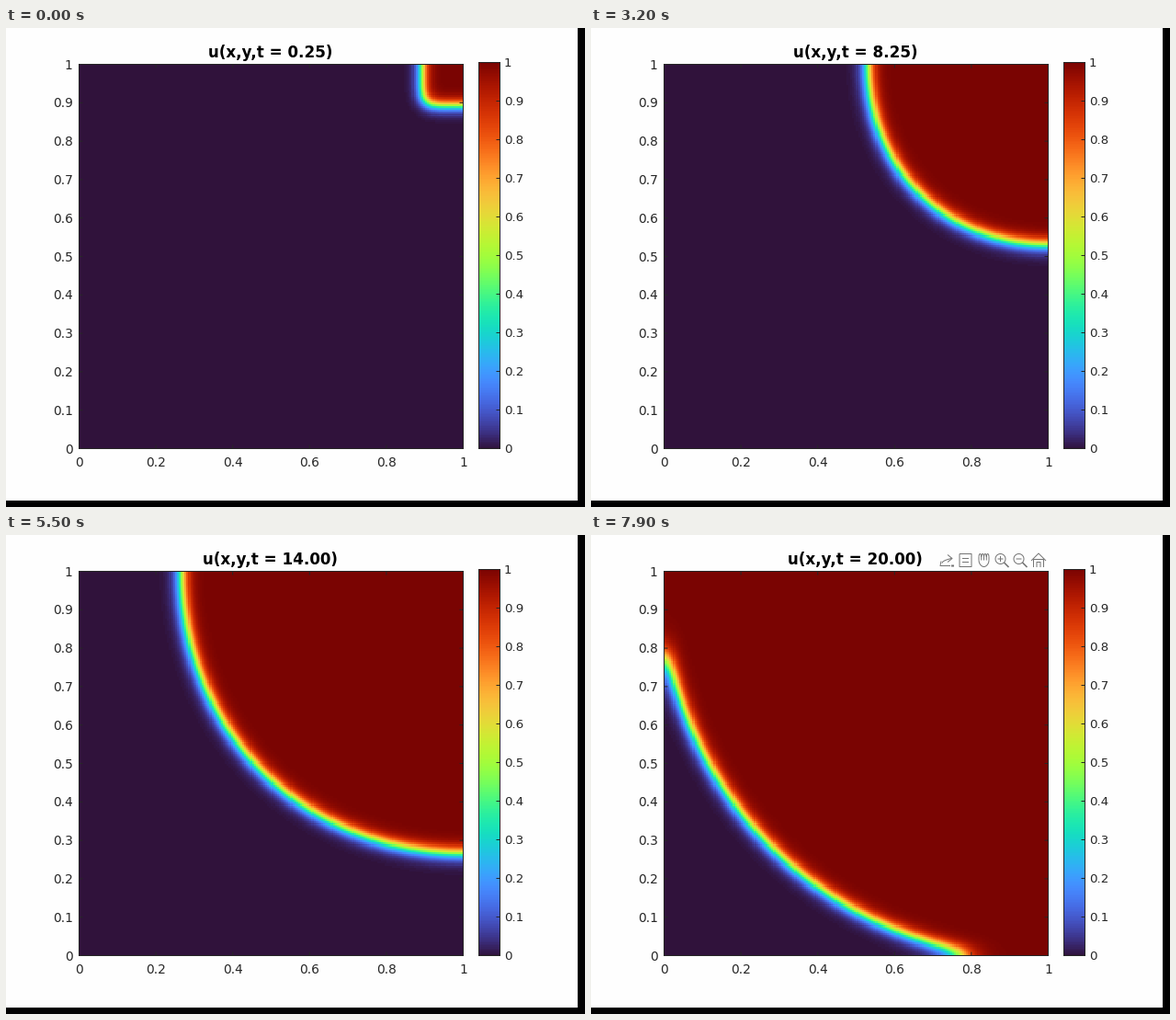
Recreate the animation shown at these times as a matplotlib script. Size 630x521 px, loop 8 s.

```python
import numpy as np
import matplotlib.pyplot as plt
from matplotlib.animation import FuncAnimation
from matplotlib.patches import Rectangle

W, H, DPI = 630, 521, 100
FRAMES, INTERVAL = 80, 100
PX = 72 / DPI  # points per pixel
INK, GRAY = "#262626", "#757575"

# Bistable front: u_t = D lap(u) + K u (1 - u)(u - A), no-flux walls
N, D, K, A = 200, 9e-4, 17.3, 0.23
T_STEP, SUB = 0.25, 50
TOOLBAR_FROM = 63


def solve():
    dt = T_STEP / SUB
    diff = D * dt * N * N
    u = np.zeros((N, N))
    u[-N // 10:, -N // 10:] = 1
    states = []
    for _ in range(FRAMES):
        for _ in range(SUB):
            p = np.pad(u, 1, mode="edge")
            lap = p[2:, 1:-1] + p[:-2, 1:-1] + p[1:-1, 2:] + p[1:-1, :-2] - 4 * u
            u = u + diff * lap + dt * K * u * (1 - u) * (u - A)
        states.append(u)
    return states


states = solve()

plt.rcParams["font.family"] = "DejaVu Sans"
fig = plt.figure(figsize=(W / DPI, H / DPI), dpi=DPI, facecolor="#fefefe")
ax = fig.add_axes([0, 0, 1, 1])
ax.axis("off")


def line(xs, ys, color=INK, lw=1.0):
    return ax.plot(xs, ys, color=color, lw=lw * PX, snap=False,
                   solid_capstyle="butt", zorder=4)[0]


def panel(data, left, right, top, bottom):
    """Colour-mapped image with a one-pixel frame on its outer pixels."""
    image = ax.imshow(data, extent=(left - 0.5, right + 0.5, bottom + 0.5, top - 0.5),
                      origin="lower", cmap="turbo", vmin=0, vmax=1,
                      interpolation="nearest", aspect="auto")
    ax.add_patch(Rectangle((left, top), right - left, bottom - top, fill=False,
                           ec=INK, lw=PX, snap=False, zorder=4))
    return image


def label(x, y, value, size, ha):
    ax.text(x, y + 0.365 * size, f"{value:.1g}", size=size * PX, color=INK,
            ha=ha, va="baseline")


# Plot area and colour bar, in pixels
L, R, T, B = 79.5, 497.5, 39.5, 457.5
CL, CR, CT = 514.5, 537.5, 37.5
TICK = 4
field = panel(states[0], L, R, T, B)
panel(np.linspace(0, 1, 256)[:, None], CL, CR, CT, B)

for v in np.linspace(0, 1, 11):
    y, yc = B + v * (T - B), B + v * (CT - B)
    line([L, L + TICK], [y, y])
    line([R - TICK, R], [y, y])
    line([CR - TICK, CR], [yc, yc])
    label(72.5, y, v, 13.8, "right")
    label(542, yc, v, 13.4, "left")
for v in np.linspace(0, 1, 6):
    x = L + v * (R - L)
    line([x, x], [T, T + TICK])
    line([x, x], [B - TICK, B])
    label(x, 471.5, v, 13.8, "center")

title = ax.text(287.7, 32, "", size=16.7 * PX, weight="bold", color="black",
                ha="center", va="baseline")

# Dark margins of the window
for x, y in ((622, 0), (0, 514)):
    ax.add_patch(Rectangle((x, y), W, H, color="black", lw=0, zorder=5))

# Toolbar, one icon every 20 px
icons = []


def stroke(slot, xs, ys, lw=1.0):
    x0 = 387 + 20 * slot
    icons.append(line(x0 + np.array(xs), 27.5 + np.array(ys), GRAY, lw))


def export(slot):
    s = np.linspace(0, 1, 12)
    stroke(slot, 10 * s - 5, 3 - 5 * np.sqrt(s))
    stroke(slot, [1, 6, 1], [-6, -2, 2])
    stroke(slot, [-6, -7, 4], [1, 6, 6])
    stroke(slot, [5, 8], [6, 6], 2)


def note(slot):
    stroke(slot, [-6, 7, 7, -6, -6], [-7, -7, 7, 7, -7])
    for y in (-2, 2):
        stroke(slot, [-3, 4], [y, y])


def hand(slot):
    x = np.linspace(-5, 6, 45)
    s = (x + 5) / 11
    stroke(slot, x, -4 - 3 * np.abs(np.sin(4 * np.pi * s)) ** 0.5)
    stroke(slot, x, 7 * np.sin(np.pi * s) ** 0.5)
    for k in range(5):
        stroke(slot, [x[11 * k]] * 2, [-4, 0])


def lens(slot, plus):
    a = np.linspace(0, 2 * np.pi, 40)
    stroke(slot, 5.5 * np.cos(a) - 1.5, 5.5 * np.sin(a) - 1.5)
    stroke(slot, [2.5, 7.5], [2.5, 7.5], 1.6)
    stroke(slot, [-4.5, 1.5], [-1.5, -1.5])
    if plus:
        stroke(slot, [-1.5, -1.5], [-4.5, 1.5])


def home(slot):
    stroke(slot, [-8, 0, 8], [0.5, -7.5, 0.5])
    for half, top in ((5.5, -1), (2, 2)):
        stroke(slot, [-half, -half, half, half], [7.5, top, top, 7.5])


export(0)
note(1)
hand(2)
lens(3, True)
lens(4, False)
home(5)

ax.set_xlim(0, W)
ax.set_ylim(H, 0)


def update(i):
    field.set_data(states[i])
    title.set_text(f"u(x,y,t = {T_STEP * (i + 1):.2f})")
    for icon in icons:
        icon.set_visible(i >= TOOLBAR_FROM)
    return [field, title, *icons]


anim = FuncAnimation(fig, update, frames=FRAMES, interval=INTERVAL,
                     repeat=True, repeat_delay=0)
plt.show()
```
